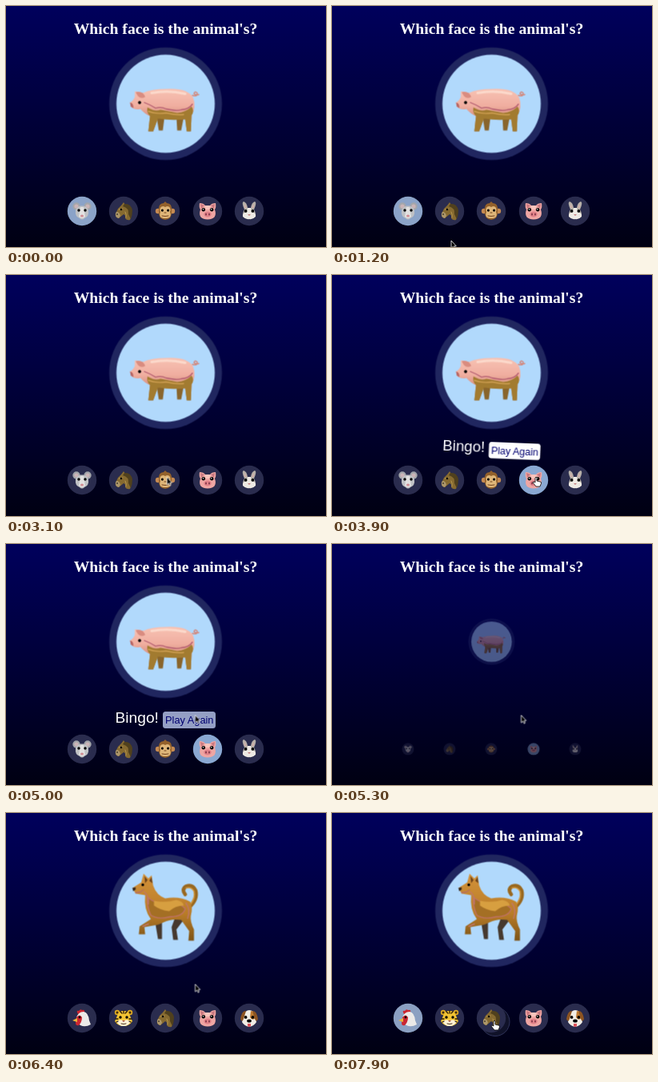
An HTML page for the animation above (8 s loop, 400 by 302 pixels).

```html
<!DOCTYPE html>
<html lang="en">
<head>
<meta charset="utf-8">
<title>Which face is the animal's?</title>
<style>
html, body { margin: 0; width: 100%; height: 100%; overflow: hidden; background: #000; }
svg { display: block; width: 100%; height: 100%; }
.title { font: bold 19.7px "Liberation Serif", Times, serif; fill: #fff; text-anchor: middle; }
.cheer { font: 19.2px "Liberation Sans", Arial, sans-serif; fill: #fff; }
.again { font: 12.8px "Liberation Sans", Arial, sans-serif; fill: #000070; }
.disc { fill: #2a2c4e; }
.ring { fill: #20265f; }
.sky { fill: #b1d9fc; }
.line { fill: none; stroke-linecap: round; stroke-linejoin: round; }

/* One loop: 1% = 80ms */
.leave, .dog, .face, .setB, .first, .chosen, .second, .result, .plate,
.cursor, .hand, .arrow, .horse, .glow, .echo { animation: 8s linear infinite both; }
.leave { animation-name: leave; }
.dog { animation-name: dog; }
.face { animation-name: face; animation-delay: var(--d); }
.setB { animation-name: setB; }
.first { animation-name: first; }
.chosen { animation-name: chosen; }
.second { animation-name: second; }
.result { animation-name: result; }
.plate { animation-name: plate; }
.cursor { animation-name: cursor; }
.hand { animation-name: hand; }
.arrow { animation-name: arrow; }
.horse { animation-name: horse; }
.glow { animation-name: glow; }
.echo { animation-name: echo; }

@keyframes leave {
  0%, 63% { transform: scale(1); opacity: 1; animation-timing-function: ease-in; }
  67.5%, 100% { transform: scale(0); opacity: 0; }
}
@keyframes dog {
  0%, 69.5% { transform: scale(0); }
  72.5% { transform: scale(.787); animation-timing-function: ease-out; }
  75%, 100% { transform: scale(1); }
}
@keyframes setB { 0%, 70% { visibility: hidden; } 70.01%, 100% { visibility: visible; } }
@keyframes face {
  0%, 75% { transform: scale(0); animation-timing-function: ease-out; }
  77.9%, 100% { transform: scale(1); }
}
@keyframes first { 0%, 23% { fill: #8ba3c8; } 24.5%, 100% { fill: #2a2c4e; } }
@keyframes second { 0%, 82% { fill: #2a2c4e; } 83.5%, 100% { fill: #8ba0c2; } }
@keyframes chosen { 0%, 42.5% { fill: #2a2c4e; } 44%, 100% { fill: #8aa8d2; } }
@keyframes result {
  0%, 45% { transform: scale(0); opacity: 0; }
  46.5% { transform: scale(1.06) rotate(-3deg); opacity: 1; }
  48.75% { transform: translateY(-1.2px) scale(.975) rotate(2.3deg); }
  50.5% { transform: rotate(-1.5deg); }
  52.5%, 63% { transform: none; opacity: 1; }
  66%, 100% { transform: scale(0); opacity: 0; }
}
@keyframes plate { 0%, 55.5% { fill: #fff; } 57.5%, 100% { fill: #949fc4; } }
@keyframes cursor {
  0%, 11% { transform: translate(150px, 314px); animation-timing-function: ease-in-out; }
  21%, 33.75% { transform: translate(147px, 254px); animation-timing-function: ease-in-out; }
  43.75%, 50% { transform: translate(255px, 253px); animation-timing-function: ease-in-out; }
  55%, 81.25% { transform: translate(236.5px, 214.5px); animation-timing-function: ease-in-out; }
  91.25%, 100% { transform: translate(203px, 260px); }
}
@keyframes hand {
  0%, 17.99%, 36%, 40.99%, 53%, 88.99% { opacity: 0; animation-timing-function: step-end; }
  18%, 35.99%, 41%, 52.99%, 89%, 100% { opacity: 1; animation-timing-function: step-end; }
}
@keyframes arrow {
  0%, 17.99%, 36%, 40.99%, 53%, 88.99% { opacity: 1; animation-timing-function: step-end; }
  18%, 35.99%, 41%, 52.99%, 89%, 100% { opacity: 0; animation-timing-function: step-end; }
}
@keyframes horse {
  0%, 23% { transform: none; }
  24% { transform: translateX(-3px) rotate(-12deg); }
  25% { transform: translate(1px, 1px) rotate(22deg) scale(.95, .75); }
  26.5% { transform: translateX(-2px) rotate(-8deg); }
  28%, 100% { transform: none; }
}
@keyframes glow { 0%, 23.5% { opacity: 0; } 24.5%, 25.5% { opacity: 1; } 27%, 100% { opacity: 0; } }
@keyframes echo { 0%, 98% { opacity: 0; } 98.5%, 100% { opacity: 1; } }
</style>
</head>
<body>
<svg viewBox="0 0 400 302" preserveAspectRatio="none">
<defs>
  <linearGradient id="night" x2="0" y2="1"><stop stop-color="#00005c"/><stop offset="1" stop-color="#000012"/></linearGradient>
  <linearGradient id="skin" x2="0" y2="1"><stop stop-color="#f8c3b4"/><stop offset=".4" stop-color="#f0aea0"/><stop offset=".65" stop-color="#d69280"/><stop offset="1" stop-color="#94662f"/></linearGradient>
  <linearGradient id="fur" x2="0" y2="1"><stop stop-color="#d3923a"/><stop offset=".6" stop-color="#b97c28"/><stop offset="1" stop-color="#7d5418"/></linearGradient>

  <g id="eyes"><circle cx="-4" cy="-1" r="1.7"/><circle cx="4" cy="-1" r="1.7"/></g>

  <g id="mouse">
    <g fill="#a3a6ab"><circle cx="-7" cy="-6" r="4.7"/><circle cx="7" cy="-6" r="4.7"/></g>
    <g fill="#cbb4b7"><circle cx="-7" cy="-6" r="2.6"/><circle cx="7" cy="-6" r="2.6"/></g>
    <path d="M-8 1C-9-9 9-9 8 1Q9 6 3 9Q0 12-3 9Q-9 6-8 1Z" fill="#bfc1c4"/>
    <path d="M-2-5H2L4 7Q0 11-4 7Z" fill="#e2e1e0"/>
    <use href="#eyes"/><ellipse cy="6" rx="2" ry="1.5" fill="#cf8a91"/>
  </g>
  <g id="horse">
    <path d="M-3-7L0-11L2-8Q9-7 9 1Q10 7 8 11Q4 12 2 9Q3 5 0 4L-6 9Q-11 8-10 3L-7-3Z" fill="#866a30"/>
    <path d="M1-9Q9-10 11-1Q11 5 9 10L6 4Q7-4-1-6Z" fill="#50401d"/>
    <path d="M-9 1Q-5 1-4 6L-6 9Q-11 8-10 3Z" fill="#ad976a"/>
    <path class="line" d="M-6-2L-1-3M2 1Q4 4 3 8" stroke="#b59650"/>
    <circle cx="-3" cy="-2" r="1.3"/><circle cx="-8" cy="4" r=".8"/>
  </g>
  <g id="monkey">
    <g fill="#c58a52"><circle cx="-9" r="3.2"/><circle cx="9" r="3.2"/></g>
    <path d="M-8 0Q-9-10-2-10L0-12L2-10Q9-10 8 0Q9 10 0 11Q-9 10-8 0Z" fill="#93612b"/>
    <path d="M0-5C4-8 8-4 6 1Q9 9 0 9Q-9 9-6 1C-8-4-4-8 0-5Z" fill="#dfb679"/>
    <use href="#eyes" transform="scale(.9)"/>
    <path class="line" d="M-4 6Q0 7 4 6M-1 2H1" stroke="#70401d"/>
  </g>
  <g id="piggy">
    <path d="M-10-10Q-5-10-3-7H3Q5-10 10-10Q11-5 9-2Q13 10 0 10.500Q-13 10-9-2Q-11-5-10-10Z" fill="#efa6a3"/>
    <path d="M-9-9L-4-7L-8-3ZM9-9L4-7L8-3Z" fill="#c97880"/>
    <path d="M-4-6Q0-8 4-6L2-2H-2Z" fill="#fac5bd"/>
    <use href="#eyes" transform="translate(0 -.5) scale(1.3)"/>
    <g fill="#fff"><circle cx="-5.500" cy="-2.300" r=".7"/><circle cx="4.700" cy="-2.300" r=".7"/></g>
    <ellipse cy="4" rx="4.7" ry="3.5" fill="#e18189"/>
    <g fill="#863c4b"><ellipse cx="-2" cy="4" rx="1" ry="1.5"/><ellipse cx="2" cy="4" rx="1" ry="1.5"/></g>
  </g>
  <g id="rabbit">
    <path d="M-6-2Q-10-11-7-12Q-3-11-2-4H2Q3-11 7-12Q10-11 6-2Q12 9 0 10Q-12 9-6-2Z" fill="#b5afa9"/>
    <path d="M-6-10L-6-4L-3-4ZM6-10L6-4L3-4Z" fill="#d1b1aa"/>
    <path d="M-2-4H2L3 1Q9 2 8 7Q4 11 0 10Q-4 11-8 7Q-9 2-3 1Z" fill="#eeeae4"/>
    <use href="#eyes" transform="translate(0 1) scale(1.1)"/><path d="M-2 4H2L0 6Z" fill="#c17c7e"/>
  </g>
  <g id="chicken">
    <path d="M-5-5Q-8-10-4-9Q-2-12 0-10Q4-11 3-7Z" fill="#cc2630"/>
    <path d="M-7 0Q-5-8 2-8Q8-7 9 3L11 8Q4 12-2 9Q-7 6-7 0Z" fill="#eceae8"/>
    <path d="M-7-1Q-3-6 0-1Q0 5-4 9Q-8 10-8 6Z" fill="#ca2732"/>
    <path d="M-6 0L-12 3L-6 5Z" fill="#e9b13b"/>
    <circle cx="-3" cy="-1" r="1.4"/>
  </g>
  <g id="tiger">
    <g fill="#dda923"><circle cx="-8" cy="-7" r="3.2"/><circle cx="8" cy="-7" r="3.2"/></g>
    <path d="M-8-3Q-6-10 0-9Q6-10 8-3L11 4Q7 10 0 10Q-7 10-11 4Z" fill="#f2c333"/>
    <path d="M-9 4Q-5 1 0 3Q5 1 9 4Q6 10 0 10Q-6 10-9 4Z" fill="#fff3d8"/>
    <path class="line" d="M0-9V-6M-4-8L-2-6M4-8L2-6M-10 1L-7 1M10 1L7 1M-9 5L-7 4M9 5L7 4" stroke="#2a1a05" stroke-width="1.3"/>
    <g fill="#422d0c"><circle cx="-8" cy="-7" r="1.5"/><circle cx="8" cy="-7" r="1.5"/></g>
    <use href="#eyes"/><path d="M-2 3H2L0 5Z" fill="#a64d42"/>
    <path class="line" d="M-3 7Q0 8 3 7" stroke="#432a10"/>
  </g>
  <g id="puppy">
    <path d="M-7-3Q-5-10 0-10Q6-10 7-3L9 5Q6 10 0 11Q-6 10-9 5Z" fill="#f1ede5"/>
    <path d="M2-9Q7-9 8 0Q4 4 1-1Z" fill="#bd7930"/>
    <path d="M-4-9Q-9-10-11 1Q-9 6-7 1ZM4-9Q9-10 11 1Q9 6 7 1Z" fill="#8d5421"/>
    <use href="#eyes" transform="scale(1.1)"/><ellipse cy="3.500" rx="2.8" ry="2"/>
    <path d="M-2 7H2V10Q0 12-2 10Z" fill="#dc4f58"/>
  </g>

  <g id="frame"><circle class="ring" r="70.5"/><circle class="sky" r="61.5"/></g>
  <g id="pig" transform="translate(-199.5 -122.5)">
    <path d="M188 137L191 156H196L198 140ZM213 138L214 156H219L222 140Z" fill="#89652c"/>
    <path class="line" d="M233 112Q240 114 239 109Q236 106 235 110Q237 112 241 111" stroke="#d4877a" stroke-width="1.5"/>
    <path d="M155 121Q159 119 161 114L161 107Q167 107 171 109Q182 104 199 104Q227 102 234 115Q238 126 232 137L231 157H226L224 142Q206 142 190 140L184 157H178L180 138Q173 135 168 129Q161 131 156 126Z" fill="url(#skin)"/>
    <path d="M177 127Q186 133 193 130Q204 132 214 134Q225 133 232 126Q236 132 232 137L231 157H226L224 142Q206 144 190 141L184 157H178L180 138Q175 133 177 127Z" fill="#a27b30"/>
    <path class="line" d="M173 121Q181 124 187 128Q194 126 200 129Q214 132 219 130Q228 130 233 123" stroke="#b35b70" stroke-width="1.3"/>
    <path class="line" d="M178 132Q188 136 200 134Q213 137 222 136" stroke="#d0a052" stroke-width="1.4"/>
    <path class="line" d="M182 109Q203 105 224 110" stroke="#fcd9cb" stroke-width="3"/>
    <path d="M162 108Q171 106 174 114Q169 117 165 113Z" fill="#d98c80"/>
    <path d="M155 121Q160 122 159 128L156 126Z" fill="#b76563"/>
    <circle cx="167" cy="121" r="1.900"/>
  </g>
  <g id="hound" transform="translate(-199.5 -122.5)">
    <path d="M186 134L190 158H195L195 136ZM211 132L207 143L209 159H215L213 146L222 134Z" fill="#46392f"/>
    <path class="line" d="M229 118Q240 108 237 97Q233 89 225 92Q219 96 224 102" stroke="#99681f" stroke-width="4.600"/>
    <path class="line" d="M231 114Q237 106 235 98Q231 92 225 94" stroke="#d0963c" stroke-width="1.6"/>
    <path d="M158 94L169 87L172 76L178 82L182 78L184 91Q188 103 199 107Q217 104 230 111Q234 118 231 129Q230 136 235 146L235 160H228L229 148L219 134Q207 132 197 137L190 140L173 143L174 152H166L167 142L181 133Q172 121 174 103L162 101Z" fill="url(#fur)"/>
    <path d="M177 106Q188 114 201 115Q215 110 224 120Q221 130 205 130Q190 134 181 128Q176 117 177 106Z" fill="#a46f24" stroke="#bf7166" stroke-width="1.3"/>
    <path d="M185 110Q199 113 213 109Q222 111 222 116Q212 116 204 123Q193 122 185 116Z" fill="#d79f40"/>
    <path class="line" d="M173 99Q179 104 178 114M225 113Q231 121 227 132M178 139L171 142" stroke="#be766b" stroke-width="1.4"/>
    <path d="M158 94L162 93L162 96L159 98Z" fill="#33251b"/>
    <path d="M173 79L177 84L174 88ZM182 80L183 88L179 85Z" fill="#6c431d"/>
    <path class="line" d="M162 100L168 99L172 96" stroke="#b66e62" stroke-width="1.3"/>
    <circle cx="171" cy="90" r="1.700"/>
  </g>
</defs>

<rect width="400" height="302" fill="url(#night)"/>
<text class="title" x="199.500" y="35">Which face is the animal's?</text>

<g transform="translate(199.5 122.5)">
  <g class="leave"><use href="#frame"/><use href="#pig"/></g>
  <g class="dog"><use href="#frame"/><use href="#hound"/></g>
</g>

<g transform="translate(95 257)"><g class="leave"><circle class="disc first" r="18.2"/><use href="#mouse"/></g></g>
<g transform="translate(147 257)"><g class="leave">
  <circle class="disc" r="18.2"/><circle class="glow" cx="-9" cy="2" r="7.5" fill="#7e94bd"/><use class="horse" href="#horse"/>
</g></g>
<g transform="translate(199 257)"><g class="leave"><circle class="disc" r="18.2"/><use href="#monkey"/></g></g>
<g transform="translate(252 257)"><g class="leave"><circle class="disc chosen" r="18.2"/><use href="#piggy"/></g></g>
<g transform="translate(304 257)"><g class="leave"><circle class="disc" r="18.2"/><use href="#rabbit"/></g></g>

<g class="setB">
  <g transform="translate(95 257)"><g class="face" style="--d:0s"><circle class="disc second" r="18.2"/><use href="#chicken"/></g></g>
  <g transform="translate(147 257)"><g class="face" style="--d:.04s"><circle class="disc" r="18.2"/><use href="#tiger"/></g></g>
  <g transform="translate(199 257)"><g class="face" style="--d:.08s">
    <circle class="echo" cx="5" cy="4.500" r="18" fill="#101229" stroke="#30345a"/>
    <circle class="disc" r="18.2"/><use href="#horse"/>
  </g></g>
  <g transform="translate(252 257)"><g class="face" style="--d:.12s"><circle class="disc" r="18.2"/><use href="#piggy"/></g></g>
  <g transform="translate(304 257)"><g class="face" style="--d:.16s"><circle class="disc" r="18.2"/><use href="#puppy"/></g></g>
</g>

<g transform="translate(199 220)"><g class="result">
  <text class="cheer" x="-62.500" y="3.500">Bingo!</text>
  <rect class="plate" x="-3" y="-10" width="66" height="21" rx="3.500"/>
  <text class="again" x="0" y="5">Play Again</text>
</g></g>

<g class="cursor">
  <path class="arrow" d="M0 0V9.500L2.200 7.500L3.600 10.500L5 9.800L3.700 6.900H6.300Z" fill="#000" stroke="#fff" stroke-width=".8"/>
  <path class="hand" d="M-1 1Q0-1 1 1V5L5 6Q7 6 6.500 8L5 12H0L-4 7Q-4 5-1 7Z" fill="#fff" stroke="#000" stroke-width=".8"/>
</g>
</svg>
</body>
</html>
```
